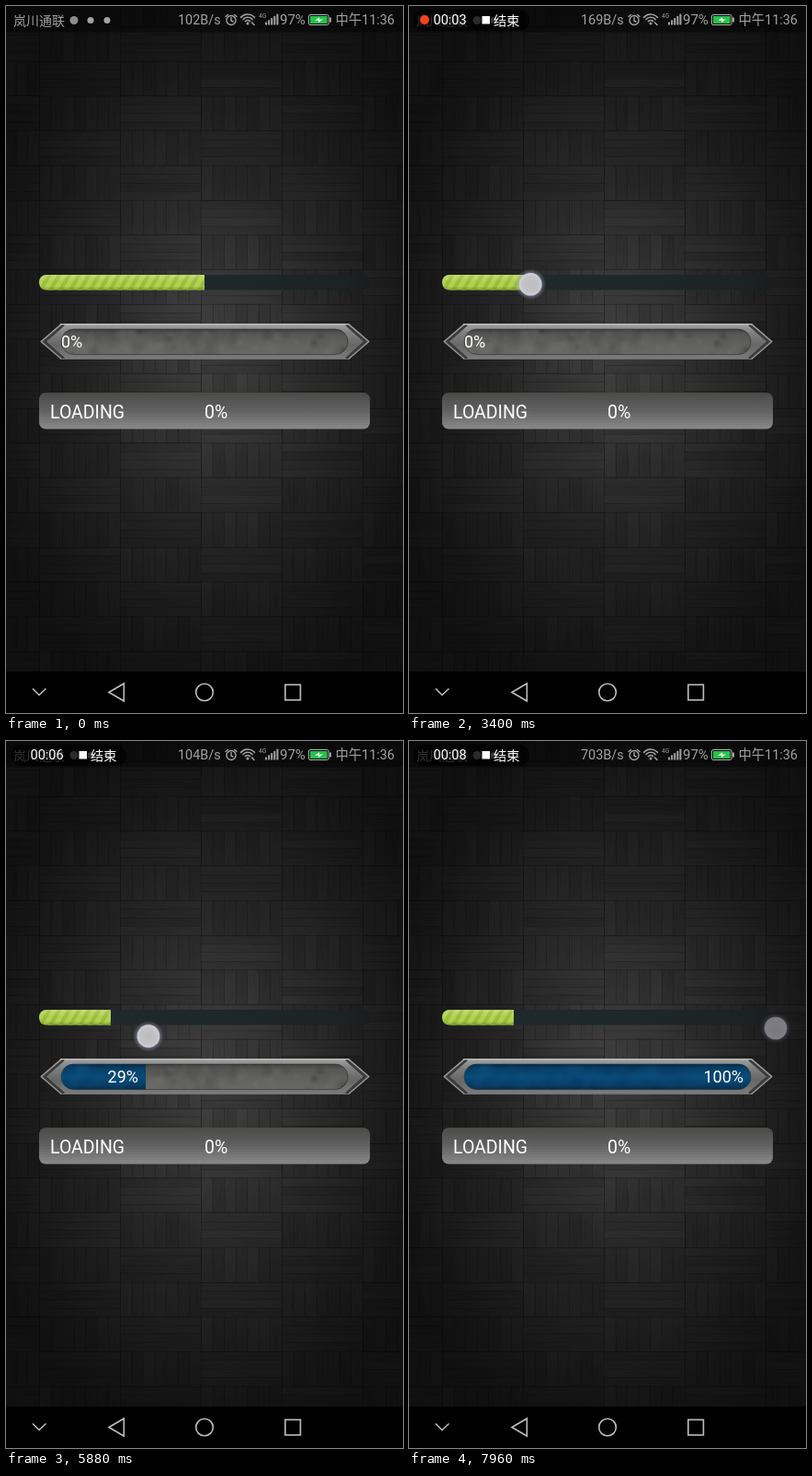
Animation, 432 px wide and 768 px high, one loop 8000 ms. Source, as an HTML page with a canvas:

```html
<!DOCTYPE html>
<html lang="zh">
<head>
<meta charset="utf-8">
<title>Progress bars</title>
<style>
html, body { margin: 0; width: 100%; height: 100%; overflow: hidden; background: #000; }
canvas { display: block; width: 432px; height: 768px; }
</style>
</head>
<body>
<canvas id="stage" width="432" height="768"></canvas>
<script>
const W = 432, H = 768, LOOP = 8000, STEP = 40;
const LATIN = 'Roboto, "Noto Sans CJK SC", "Noto Sans CJK", sans-serif';
const ICON = '#a2a2a2';
const ctx = document.getElementById('stage').getContext('2d');

// Touch paths: time, x, y
const firstDrag = [
  [600, 216, 299], [800, 236, 290], [1100, 284, 265], [1400, 328, 244], [1480, 336, 240],
  [1800, 350, 243], [2100, 347, 260], [2280, 334, 274], [2480, 290, 286], [2600, 264, 291],
  [2720, 245, 294], [2900, 220, 296], [3200, 164, 300], [3480, 122, 303], [3640, 114, 303], [3840, 114, 303]
];
const secondDrag = [
  [4000, 80, 360], [4120, 99, 358], [4240, 121, 355], [4400, 150, 351], [4640, 188, 346],
  [4840, 166, 340], [5060, 101, 333], [5200, 94, 330], [5320, 93, 328], [5640, 122, 324],
  [6000, 174, 319], [6300, 230, 315], [6480, 259, 313], [6700, 292, 313], [7000, 334, 313],
  [7320, 372, 312], [7640, 395, 312], [7960, 399, 312], [8000, 399, 312]
];

const clamp = (v, a, b) => Math.min(b, Math.max(a, v));

// Smooth curve through keys of uneven spacing
function sample(keys, t, axis) {
  const last = keys.length - 1;
  t = clamp(t, keys[0][0], keys[last][0]);
  let i = 0;
  while (i < last - 1 && t > keys[i + 1][0]) i++;
  const slope = k => {
    const a = keys[Math.max(0, k - 1)], b = keys[Math.min(last, k + 1)];
    return (b[axis] - a[axis]) / (b[0] - a[0]);
  };
  const a = keys[i], b = keys[i + 1], d = b[0] - a[0];
  const u = (t - a[0]) / d, u2 = u * u, u3 = u2 * u;
  return (2 * u3 - 3 * u2 + 1) * a[axis] + (u3 - 2 * u2 + u) * d * slope(i)
    + (3 * u2 - 2 * u3) * b[axis] + (u3 - u2) * d * slope(i + 1);
}

function seeded(seed) {
  return () => {
    seed = (seed * 1664525 + 1013904223) >>> 0;
    return seed / 4294967296;
  };
}

function layer(draw) {
  const c = document.createElement('canvas');
  c.width = W;
  c.height = H;
  draw(c.getContext('2d'));
  return c;
}

function gradient(g, x0, y0, x1, y1, stops) {
  const fill = g.createLinearGradient(x0, y0, x1, y1);
  stops.forEach(([p, c]) => fill.addColorStop(p, c));
  return fill;
}

function roundRect(g, x, y, w, h, r) {
  g.beginPath();
  g.roundRect(x, y, w, h, r);
}

function poly(g, ...pts) {
  g.beginPath();
  pts.forEach(([x, y], i) => i ? g.lineTo(x, y) : g.moveTo(x, y));
}

function disc(g, x, y, r, color) {
  g.fillStyle = color;
  g.beginPath();
  g.arc(x, y, r, 0, 7);
  g.fill();
}

function label(g, str, x, y, size, color, align = 'left') {
  g.font = `${size}px ${LATIN}`;
  g.textAlign = align;
  g.fillStyle = color;
  g.fillText(str, x, y);
}

function parquet(g) {
  g.fillStyle = '#101010';
  g.fillRect(0, 0, W, H);
  g.save();
  g.translate(225, 365);
  g.scale(0.66, 1);
  const glow = g.createRadialGradient(0, 0, 0, 0, 0, 410);
  [[0, '#414141'], [0.2, '#393939'], [0.42, '#2b2b2b'], [0.65, '#202020'], [0.85, '#171717'], [1, '#121212']]
    .forEach(([p, c]) => glow.addColorStop(p, c));
  g.fillStyle = glow;
  g.fillRect(-500, -400, 1000, 900);
  g.restore();

  const rnd = seeded(17), bw = 88, bh = 37.7;
  for (let row = -6; row < 15; row++) {
    for (let col = -1; col < 5; col++) {
      const x = 36 + col * bw, y = 210.5 + row * bh;
      const upright = (row + col + 20) % 2 === 1;
      const n = upright ? 7 : 4;
      for (let k = 0; k < n; k++) {
        const w = upright ? bw / n : bw, h = upright ? bh : bh / n;
        const px = upright ? x + k * w : x, py = upright ? y : y + k * h;
        g.fillStyle = `rgba(0,0,0,${rnd() * 0.14})`;
        g.fillRect(px, py, w, h);
        for (let s = 0; s < 5; s++) {
          const len = 0.2 + rnd() * 0.5, off = rnd() * (1 - len), at = rnd();
          g.fillStyle = rnd() < 0.6 ? 'rgba(0,0,0,.05)' : 'rgba(255,255,255,.008)';
          if (upright) g.fillRect(px + at * w, py + off * h, 1, len * h);
          else g.fillRect(px + off * w, py + at * h, len * w, 1);
        }
        g.fillStyle = 'rgba(0,0,0,.16)';
        if (upright) g.fillRect(Math.round(px), py, 1, h);
        else g.fillRect(px, Math.round(py), w, 1);
      }
      g.strokeStyle = 'rgba(0,0,0,.12)';
      g.lineWidth = 1;
      g.strokeRect(Math.round(x) + 0.5, Math.round(y) + 0.5, bw, bh);
    }
  }
}

function mottle(g, seed, dark, light) {
  const rnd = seeded(seed);
  for (let i = 0; i < 110; i++) {
    const x = 56 + rnd() * 320, y = 348 + rnd() * 34, r = 3 + rnd() * 10;
    const tint = rnd() < 0.5 ? dark : light;
    const spot = g.createRadialGradient(x, y, 0, x, y, r);
    spot.addColorStop(0, `rgba(${tint},.11)`);
    spot.addColorStop(1, `rgba(${tint},0)`);
    g.fillStyle = spot;
    g.fillRect(x - r, y - r, 2 * r, 2 * r);
  }
}

function trough(g, stops, seed, dark, light) {
  g.save();
  roundRect(g, 60, 351, 312, 27.5, 13.7);
  g.clip();
  g.fillStyle = gradient(g, 0, 351, 0, 378.5, stops);
  g.fillRect(60, 351, 312, 28);
  mottle(g, seed, dark, light);
  g.restore();
}

function metalFrame(g) {
  poly(g, [37, 364.5], [60, 345], [373, 345], [396, 364.5], [373, 384], [60, 384]);
  g.fillStyle = gradient(g, 0, 345, 0, 384, [[0, '#a4a4a4'], [0.25, '#808080'], [0.6, '#666'], [1, '#7c7c7c']]);
  g.fill();
  for (const flip of [false, true]) {
    const m = x => flip ? 433 - x : x;
    g.lineWidth = 2.6;
    g.strokeStyle = '#3a3a3a';
    poly(g, [m(63), 346], [m(42), 364.5], [m(63), 383]);
    g.stroke();
    g.lineWidth = 1;
    g.strokeStyle = '#a0a0a0';
    poly(g, [m(60), 345.5], [m(38), 364.5], [m(60), 383.5]);
    g.stroke();
  }
  g.fillStyle = '#c0c0c0';
  g.fillRect(59, 345, 314, 1.3);
  g.fillStyle = '#6d6d6d';
  g.fillRect(60, 383, 312, 1);
  trough(g, [[0, '#40403f'], [0.2, '#575755'], [0.6, '#626260'], [1, '#676765']], 5, '20,20,20', '150,150,145');
  g.strokeStyle = 'rgba(30,30,30,.5)';
  g.lineWidth = 1;
  roundRect(g, 60, 351, 312, 27.5, 13.7);
  g.stroke();
}

function loadingPanel(g) {
  g.save();
  roundRect(g, 36, 420, 360, 39.5, 7);
  g.clip();
  g.fillStyle = gradient(g, 0, 420, 0, 459, [[0, '#4b4b49'], [0.5, '#626262'], [1, '#8a8a8a']]);
  g.fillRect(36, 420, 360, 40);
  g.fillStyle = 'rgba(0,0,0,.03)';
  for (let y = 421; y < 459; y += 3) g.fillRect(36, y, 360, 1);
  g.restore();
  label(g, 'LOADING', 48, 448, 19.5, '#fff');
  label(g, '0%', 216, 448, 19.5, '#fff');
}

function statusIcons(g) {
  label(g, '岚川通联', 8, 20.5, 14, ICON);
  disc(g, 74, 15.5, 4.5, '#8c8c8c');
  disc(g, 92, 15.5, 3.5, ICON);
  disc(g, 110, 15.5, 3.5, ICON);

  g.strokeStyle = ICON;
  g.lineWidth = 1.4;
  g.lineCap = 'round';
  g.beginPath();
  g.arc(245, 15.5, 5, 0, 7);
  g.stroke();
  poly(g, [245, 12.5], [245, 16], [247, 17]);
  g.stroke();
  poly(g, [239, 11.5], [241.5, 9.5]);
  g.stroke();
  poly(g, [251, 11.5], [248.5, 9.5]);
  g.stroke();

  g.lineWidth = 1.6;
  for (const r of [3.5, 6.7, 10]) {
    g.beginPath();
    g.arc(263, 19, r, -Math.PI * 0.77, -Math.PI * 0.23);
    g.stroke();
  }
  disc(g, 263, 19, 1.5, ICON);
  poly(g, [267.5, 18], [270, 20.5]);
  g.stroke();
  g.lineCap = 'butt';

  label(g, '4G', 275, 13, 6.5, ICON);
  g.fillStyle = ICON;
  for (let i = 0; i < 5; i++) g.fillRect(282 + i * 3.1, 17.5 - i * 2.2, 2, 3 + i * 2.2);

  label(g, '97%', 298, 20.3, 15, ICON);
  g.strokeStyle = '#aeb5ae';
  g.lineWidth = 1;
  roundRect(g, 329.5, 9.5, 21.5, 11, 1.5);
  g.stroke();
  g.fillStyle = '#27c24c';
  g.fillRect(331, 11, 18.5, 8);
  g.fillStyle = '#aeb5ae';
  g.fillRect(352, 12.5, 1.8, 5);
  poly(g, [336, 15.8], [341, 12.2], [341, 14.4], [345, 14.4], [340, 18], [340, 15.8]);
  g.fillStyle = '#e8f5e8';
  g.fill();
  label(g, '中午11:36', 358.5, 20.3, 14.3, ICON);
}

function navBar(g) {
  g.fillStyle = '#000';
  g.fillRect(0, 723, W, 45);
  g.strokeStyle = '#bdbdbd';
  g.lineWidth = 1.6;
  poly(g, [29, 741.5], [36, 748.5], [43.5, 741.5]);
  g.stroke();
  poly(g, [112, 745.5], [128.3, 736], [128.3, 755]);
  g.closePath();
  g.stroke();
  g.beginPath();
  g.arc(216, 745.5, 9.3, 0, 7);
  g.stroke();
  g.strokeRect(303.8, 737.3, 16.6, 16.6);
}

const scene = layer(g => {
  parquet(g);
  g.fillStyle = 'rgba(0,0,0,.42)';
  g.fillRect(0, 0, W, 28.5);
  statusIcons(g);
  g.fillStyle = gradient(g, 36, 0, 396, 0, [[0, '#20292b'], [0.5, '#1e282a'], [0.93, '#1b2224'], [1, '#181b1c']]);
  roundRect(g, 36, 292, 360, 16.5, 8);
  g.fill();
  metalFrame(g);
  loadingPanel(g);
  navBar(g);
});

const greenFill = layer(g => {
  roundRect(g, 36, 292, 360, 16.5, 8);
  g.clip();
  g.fillStyle = '#b3d34f';
  g.fillRect(36, 292, 360, 17);
  g.fillStyle = '#9bbf3e';
  for (let x = 24; x < 400; x += 10.8) {
    poly(g, [x, 309], [x + 10, 292], [x + 15, 292], [x + 5, 309]);
    g.fill();
  }
  g.fillStyle = gradient(g, 0, 292, 0, 308.5,
    [[0, 'rgba(255,255,255,.22)'], [0.3, 'rgba(255,255,255,.06)'], [0.75, 'rgba(0,0,0,0)'], [1, 'rgba(40,60,0,.28)']]);
  g.fillRect(36, 292, 360, 17);
});

const blueFill = layer(g => trough(g,
  [[0, '#062c49'], [0.2, '#084069'], [0.5, '#094c7b'], [0.8, '#083f68'], [1, '#052e4d']],
  9, '2,25,45', '16,96,148'));

function reveal(img, x, y, w, h) {
  if (w <= 0) return;
  ctx.save();
  ctx.beginPath();
  ctx.rect(x, y, w, h);
  ctx.clip();
  ctx.drawImage(img, 0, 0);
  ctx.restore();
}

function recorder(t) {
  const clock = t + 160;
  ctx.globalAlpha = clamp(t / 200, 0, 1);
  roundRect(ctx, 5, 4, 126, 23, 11.5);
  ctx.fillStyle = 'rgba(0,0,0,.7)';
  ctx.fill();
  if (clock % 1000 >= 500) disc(ctx, 17, 15, 5, '#f5431c');
  label(ctx, '00:0' + Math.floor(clock / 1000), 26.5, 20.3, 14.5, '#fff');
  ctx.fillStyle = '#fff';
  ctx.fillRect(79.5, 11, 8.5, 8.5);
  label(ctx, '结束', 92, 20.5, 14.2, '#fff');
  ctx.globalAlpha = 1;
}

function touch(x, y, alpha) {
  ctx.globalAlpha = alpha;
  const halo = ctx.createRadialGradient(x, y, 11, x, y, 17);
  halo.addColorStop(0, 'rgba(205,205,235,.75)');
  halo.addColorStop(0.4, 'rgba(170,170,205,.35)');
  halo.addColorStop(1, 'rgba(150,150,190,0)');
  disc(ctx, x, y, 17, halo);
  const body = ctx.createRadialGradient(x, y, 0, x, y, 12.5);
  body.addColorStop(0, '#bdbcbf');
  body.addColorStop(0.75, '#c5c4c8');
  body.addColorStop(1, '#d6d5e0');
  disc(ctx, x, y, 12.3, body);
  ctx.globalAlpha = 1;
}

function drag(keys, t, start, fadeFrom, fadeTime) {
  const alpha = Math.min(clamp((t - start + STEP) / 80, 0, 1), clamp(1 - (t - fadeFrom) / fadeTime, 0, 1));
  if (alpha > 0) touch(sample(keys, t, 1), sample(keys, t, 2), alpha * 0.95);
}

function speed(t) {
  return t < 360 ? 102 : t < 3440 ? 169 : t < 6520 ? 104 : 703;
}

function render(t) {
  ctx.drawImage(scene, 0, 0);
  label(ctx, speed(t) + 'B/s', 187, 20.3, 14.4, ICON);
  if (t >= STEP) recorder(t);

  // Fills trail the finger slightly
  reveal(greenFill, 36, 290, Math.round(sample(firstDrag, t - 20, 1)) - 36, 20);

  const share = t < 4000 ? 0 : clamp((sample(secondDrag, t - 22, 1) - 60) / 312, 0, 1);
  const width = share > 0 ? Math.max(38, Math.round(share * 312)) : 0;
  reveal(blueFill, 60, 350, width, 30);
  const text = Math.floor(share * 100) + '%';
  ctx.font = `18px ${LATIN}`;
  const textX = Math.max(60, 60 + Math.min(width - 8, 307) - ctx.measureText(text).width);
  label(ctx, text, textX, 371.3, 18, '#fff');

  if (t < 4000) drag(firstDrag, t, 600, 3720, 120);
  else drag(secondDrag, t, 4000, 7840, 200);
}

const begin = performance.now();
function tick() {
  const t = (performance.now() - begin) % LOOP;
  render(Math.floor(t / STEP) * STEP);
  requestAnimationFrame(tick);
}
tick();
</script>
</body>
</html>
```
